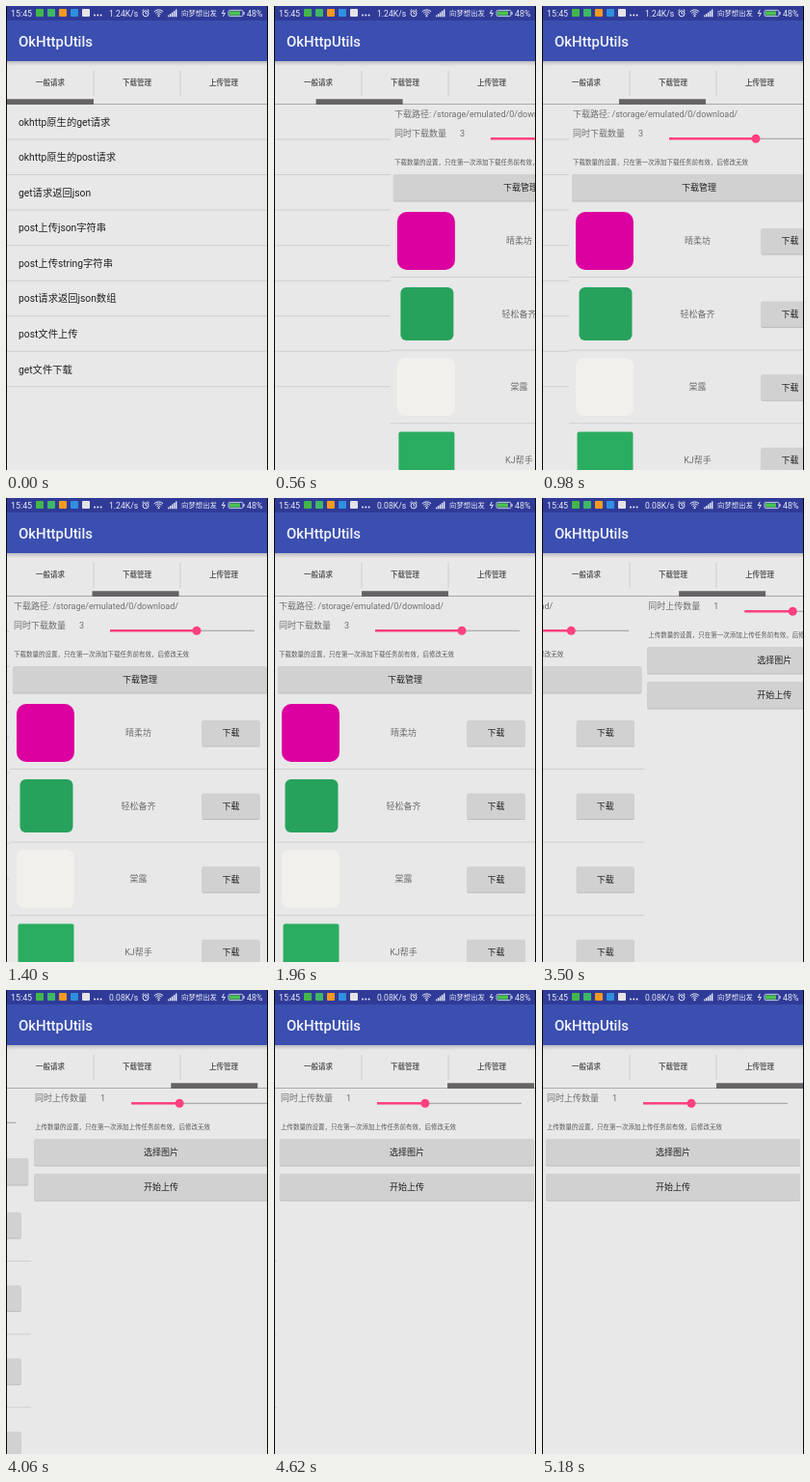
Recreate the animation shown at these times as an HTML page with a canvas. Size 272x480 px, loop 5320 ms.

```html
<!DOCTYPE html>
<html lang="zh-CN">
<head>
<meta charset="utf-8">
<title>OkHttpUtils</title>
<style>
  html, body { margin: 0; width: 100%; height: 100%; overflow: hidden; background: #000; }
  canvas { display: block; width: 100vw; height: 100vh; }
</style>
</head>
<body>
<canvas id="stage"></canvas>
<script>
const W = 272, H = 480, LOOP = 5320, STEP = 140, PAGE = 270;
const FAMILY = 'Roboto, "Noto Sans CJK SC", "Noto Sans CJK", sans-serif';
const PINK = '#ff4081', GREY = '#6f6f6f', INK = '#202020', LINE = '#cfcfcf';

const canvas = document.getElementById('stage');
const scale = window.devicePixelRatio || 1;
canvas.width = W * scale;
canvas.height = H * scale;
const ctx = canvas.getContext('2d');

// Swipe progress sampled once per step from its start time.
const swipes = [
  { start: 140, path: [0, .1, .3, .556, .72, .83, .9, .945, .972, .989, .996, 1] },
  { start: 2660, path: [0, .03, .093, .2, .34, .48, .61, .72, .8, .86, .907, .94, .965, .982, .993, 1] }
];

function swipeProgress({ start, path }, t) {
  const pos = Math.min(Math.max((t - start) / STEP, 0), path.length - 1);
  const i = Math.min(Math.floor(pos), path.length - 2);
  return path[i] + (path[i + 1] - path[i]) * (pos - i);
}

const scrollAt = t => swipes.reduce((sum, s) => sum + swipeProgress(s, t), 0);

function rect(x, y, w, h, color, radius = 0) {
  ctx.fillStyle = color;
  ctx.beginPath();
  ctx.roundRect(x, y, w, h, radius);
  ctx.fill();
}

function disc(x, y, r, color) {
  ctx.fillStyle = color;
  ctx.beginPath();
  ctx.arc(x, y, r, 0, Math.PI * 2);
  ctx.fill();
}

// y is the visual middle of the line.
function text(str, x, y, size, color = GREY, align = 'left', weight = 400) {
  ctx.font = `${weight} ${size}px ${FAMILY}`;
  ctx.textAlign = align;
  ctx.fillStyle = color;
  ctx.fillText(str, x, y + size * 0.36);
}

function shade(y, h, from, to) {
  const g = ctx.createLinearGradient(0, y, 0, y + h);
  g.addColorStop(0, from);
  g.addColorStop(1, to);
  rect(0, y, W, h, g);
}

function button(label, x, y, w, h) {
  rect(x, y + 1, w, h, '#bdbdbd', 1.5);
  rect(x, y, w, h, '#d1d1d1', 1.5);
  text(label, x + w / 2, y + h / 2, 9, INK, 'center', 500);
}

function slider(y, thumb) {
  rect(105, y - .5, 150, 1, '#9b9b9b');
  rect(105, y - 1.2, thumb - 105, 2.4, PINK);
  disc(thumb, y, 4.5, PINK);
}

function countSetting(kind, y, value, thumb) {
  text(`同时${kind}数量`, 5, y, 9);
  text(value, 73, y, 9);
  slider(y + 5.3, thumb);
  text(`${kind}数量的设置，只在第一次添加${kind}任务前有效，后修改无效`, 5, y + 29.5, 6.5, '#565656');
}

const requests = [
  'okhttp原生的get请求', 'okhttp原生的post请求', 'get请求返回json', 'post上传json字符串',
  'post上传string字符串', 'post请求返回json数组', 'post文件上传', 'get文件下载'
];

function requestPage() {
  requests.forEach((label, i) => {
    const y = 120 + i * 36.55;
    text(label, 13, y, 10.3, INK);
    rect(1, y + 17.5, PAGE, 1, LINE);
  });
}

const apps = [
  { name: '晴柔坊', color: '#dc00a0', x: 8, y: 213, size: 60, radius: 10 },
  { name: '轻松备齐', color: '#27a25c', x: 11.5, y: 291, size: 55, radius: 6 },
  { name: '棠露', color: '#f2f0ed', x: 8, y: 364, size: 60, radius: 8 },
  { name: 'KJ帮手', color: '#2aad61', x: 9.5, y: 440.5, size: 58, radius: 2 }
];

function downloadPage() {
  text('下载路径: /storage/emulated/0/download/', 5, 112, 9);
  countSetting('下载', 132, '3', 195);
  button('下载管理', 4, 174, 264, 27.5);
  apps.forEach((app, i) => {
    const y = 243 + i * 75.6;
    rect(app.x, app.y, app.size, app.size, app.color, app.radius);
    text(app.name, 134.5, y, 9, GREY, 'center');
    button('下载', 200.5, y - 13, 60, 26.5);
    rect(1, y + 37, PAGE, 1, LINE);
  });
}

function uploadPage() {
  countSetting('上传', 112, '1', 155);
  button('选择图片', 4, 154, 264, 27.5);
  button('开始上传', 4, 190, 264, 27.5);
}

const pages = [requestPage, downloadPage, uploadPage];

function drawPages(scroll) {
  pages.forEach((draw, i) => {
    const x = (i - scroll) * PAGE;
    if (Math.abs(x) >= PAGE) return;
    ctx.save();
    ctx.translate(x, 0);
    draw();
    ctx.restore();
  });
}

function drawTabs(scroll) {
  rect(0, 57, W, 45, '#e8e8e8');
  shade(57, 5, '#bcbcc0', '#e8e8e8');
  rect(0, 101, W, 1, '#a9a9a9');
  ['一般请求', '下载管理', '上传管理'].forEach((label, i) => {
    text(label, 46 + i * 90, 79, 7.5, '#5e5e5e', 'center', 700);
    if (i) rect(i * 90 + .5, 67, 1, 26, '#cdcdcd');
  });
  rect(1 + scroll * 90, 96.3, 90, 5.7, '#666367');
}

function stroke(color, width, trace) {
  ctx.strokeStyle = color;
  ctx.lineWidth = width;
  ctx.beginPath();
  trace();
  ctx.stroke();
}

function drawStatus(speed) {
  const white = '#e9ebf7';
  rect(0, 0, W, 15, '#303b98');
  text('15:45', 5, 7.5, 8.9, white);
  ['#42b649', '#3fb768', '#f49a20', '#2f8fe0', '#e5e3e6']
    .forEach((color, i) => rect(31 + i * 12, 3, 8, 8, color, 1));
  for (let i = 0; i < 3; i++) disc(92 + i * 3.3, 9.5, 1, white);
  text(speed, 107, 7.5, 8.6, white);

  // Alarm clock
  stroke(white, 1, () => {
    ctx.arc(145, 7.8, 3, 0, Math.PI * 2);
    ctx.moveTo(145, 6); ctx.lineTo(145, 8); ctx.lineTo(146.5, 8);
    ctx.moveTo(141.4, 5); ctx.lineTo(143.2, 3.5);
    ctx.moveTo(148.6, 5); ctx.lineTo(146.8, 3.5);
  });
  // Wireless waves
  for (const r of [2.6, 4.6, 6.6]) {
    stroke(white, 1, () => ctx.arc(158.5, 10.5, r, -Math.PI * .76, -Math.PI * .24));
  }
  disc(158.5, 10.3, 1, white);
  // Signal bars
  for (let i = 0; i < 5; i++) rect(168 + i * 2, 9.6 - i * 1.5, 1.4, 1.6 + i * 1.5, white);

  text('向梦想出发', 182, 7.5, 7.4, white);
  // Charging bolt and battery
  stroke(white, 1, () => {
    ctx.moveTo(226.3, 4); ctx.lineTo(224.2, 7.6);
    ctx.lineTo(227.4, 7.3); ctx.lineTo(225.3, 10.8);
  });
  stroke(white, .8, () => ctx.roundRect(231, 4.4, 15, 6.2, 1.5));
  rect(232, 5.4, 11, 4.2, '#4cc24f');
  rect(246.4, 6.2, 1.2, 2.6, white);
  text('48%', 250, 7.5, 8.9, white);
}

function drawHeader(speed) {
  rect(0, 15, W, 42, '#3b4fb0');
  text('OkHttpUtils', 13, 36.3, 14.9, '#f2f3fa', 'left', 500);
  drawStatus(speed);
}

function draw(t) {
  ctx.setTransform(scale, 0, 0, scale, 0, 0);
  rect(0, 0, W, H, '#e8e8e8');
  drawPages(scrollAt(t));
  // The tab marker trails the pages slightly.
  drawTabs(scrollAt(t - 45));
  drawHeader(t < 1680 ? '1.24K/s' : '0.08K/s');
  rect(0, 0, 1, H, '#08080c');
  rect(W - 1, 0, 1, H, '#08080c');
}

let origin;
function tick(now) {
  origin ??= now;
  const t = (now - origin) % LOOP;
  draw(Math.floor(t / STEP) * STEP);
  requestAnimationFrame(tick);
}
requestAnimationFrame(tick);
</script>
</body>
</html>
```
